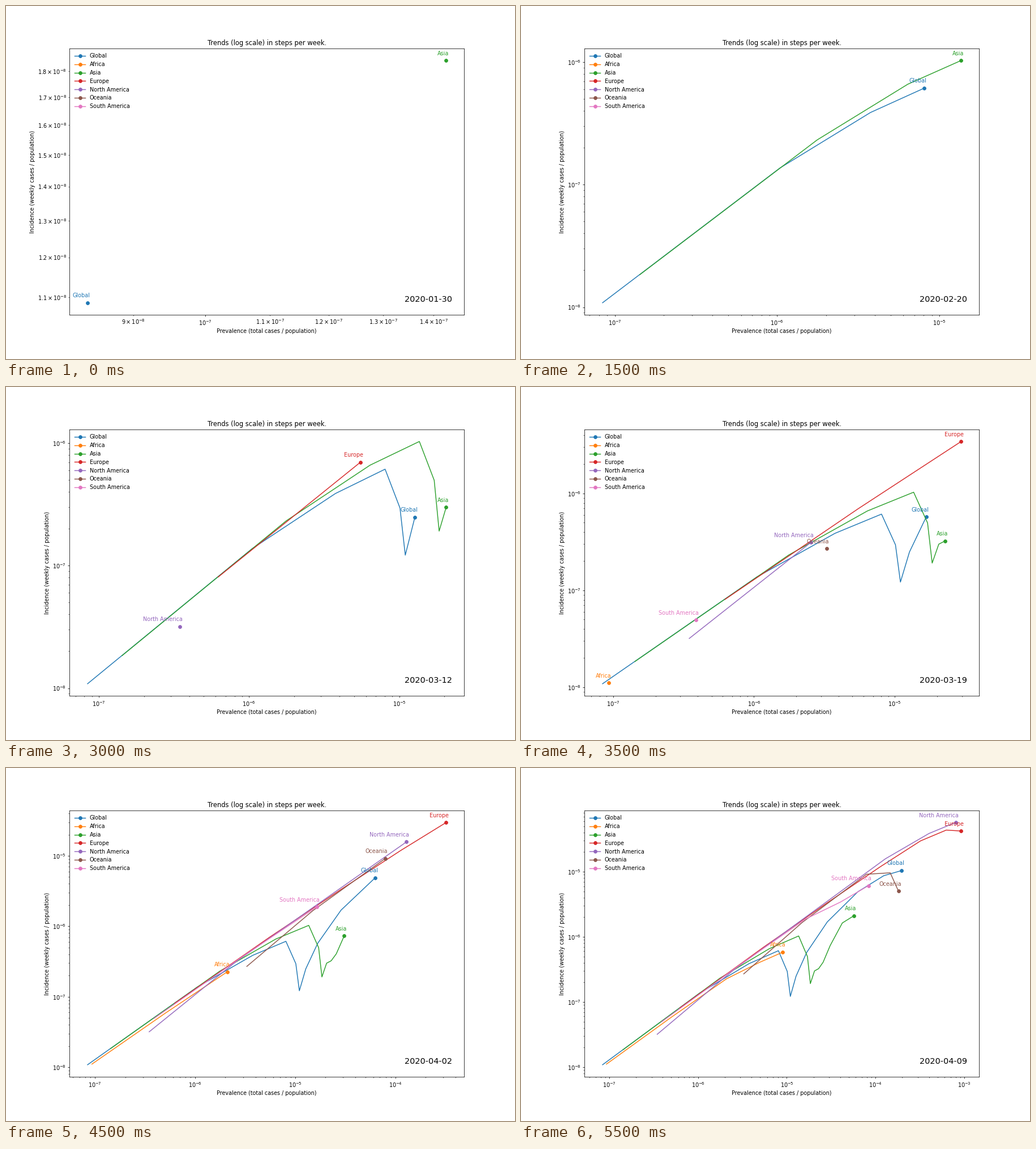
Write a matplotlib script that moves like this. It is 899 px wide and 623 px high and loops after 10000 ms.

```python
import numpy as np
import matplotlib.pyplot as plt
from matplotlib.animation import FuncAnimation

W, H = 899, 623
DPI = W / 13
WEEKS = 12
FRAMES, STEP_MS = 20, 500

# name: (first incidence, weekly prevalence up to the last week, per 1e-6)
REGIONS = {
    "Global": (1.087e-8, [0.0841, 1.044, 3.76, 8.05, 10.115, 10.968,
                          12.71, 16.73, 28.59, 62.89, 123.7, 196.6]),
    "Africa": (1.111e-8, [0.093, 0.506, 2.092, 4.93, 9.0]),
    "Asia": (1.842e-8, [0.1426, 1.766, 6.39, 13.61, 17.09, 18.43,
                        20.53, 22.8, 25.65, 30.78, 42.21, 56.95]),
    "Europe": (8.08e-8, [0.623, 5.5, 29.61, 113, 321, 626, 921]),
    "North America": (3.19e-8, [0.347, 2.538, 18.5, 129, 399, 798]),
    "Oceania": (2.70e-7, [3.276, 14.9, 78.9, 146.2, 181.3]),
    "South America": (4.93e-8, [0.3876, 3.18, 16.36, 40.35, 83.1]),
}


class Region:
    def __init__(self, ax, name, color, first, prevalence):
        self.x = np.array(prevalence) * 1e-6
        self.y = np.append(first, np.diff(self.x) / 7)
        self.start = WEEKS - len(self.x)
        self.line, = ax.plot([], [], color=color, marker="o",
                             markevery=[-1], label=name)
        self.tag = ax.annotate(name, (1, 1), xytext=(5, 10), ha="right",
                               textcoords="offset points", color=color)
        self.tag.set_visible(False)

    def show(self, week):
        n = max(0, week + 1 - self.start)
        x, y = self.x[:n], self.y[:n]
        self.line.set_data(x, y)
        self.line.set_visible(n > 0)
        self.tag.set_visible(n > 0)
        if n:
            self.tag.xy = x[-1], y[-1]
        return x, y


def log_limits(values):
    lo, hi = np.log10([values.min(), values.max()])
    pad = 0.05 * (hi - lo)
    return 10 ** (lo - pad), 10 ** (hi + pad)


fig, ax = plt.subplots(figsize=((W + 0.01) / DPI, (H + 0.01) / DPI), dpi=DPI)
fig.subplots_adjust(left=0.125, right=0.9, bottom=0.125, top=0.88)
ax.set_xscale("log")
ax.set_yscale("log")
ax.set_title("Trends (log scale) in steps per week.")
ax.set_xlabel("Prevalence (total cases / population)")
ax.set_ylabel("Incidence (weekly cases / population)")

regions = [Region(ax, name, f"C{i}", *data)
           for i, (name, data) in enumerate(REGIONS.items())]
handles = [plt.Line2D([], [], color=r.line.get_color(), marker="o")
           for r in regions]
ax.legend(handles, list(REGIONS), loc="upper left", frameon=False)
date = ax.text(0.97, 0.05, "", transform=ax.transAxes, ha="right", size=15)


def update(frame):
    week = min(frame, WEEKS - 1)
    shown = [r.show(week) for r in regions]
    ax.set_xlim(log_limits(np.concatenate([x for x, _ in shown])))
    ax.set_ylim(log_limits(np.concatenate([y for _, y in shown])))
    # the date runs one week ahead and stops at the last one
    day = np.datetime64("2020-01-30") + 7 * min(week, WEEKS - 2)
    date.set_text(str(day))


anim = FuncAnimation(fig, update, frames=FRAMES, interval=STEP_MS,
                     repeat=True, repeat_delay=0)
plt.show()
```
